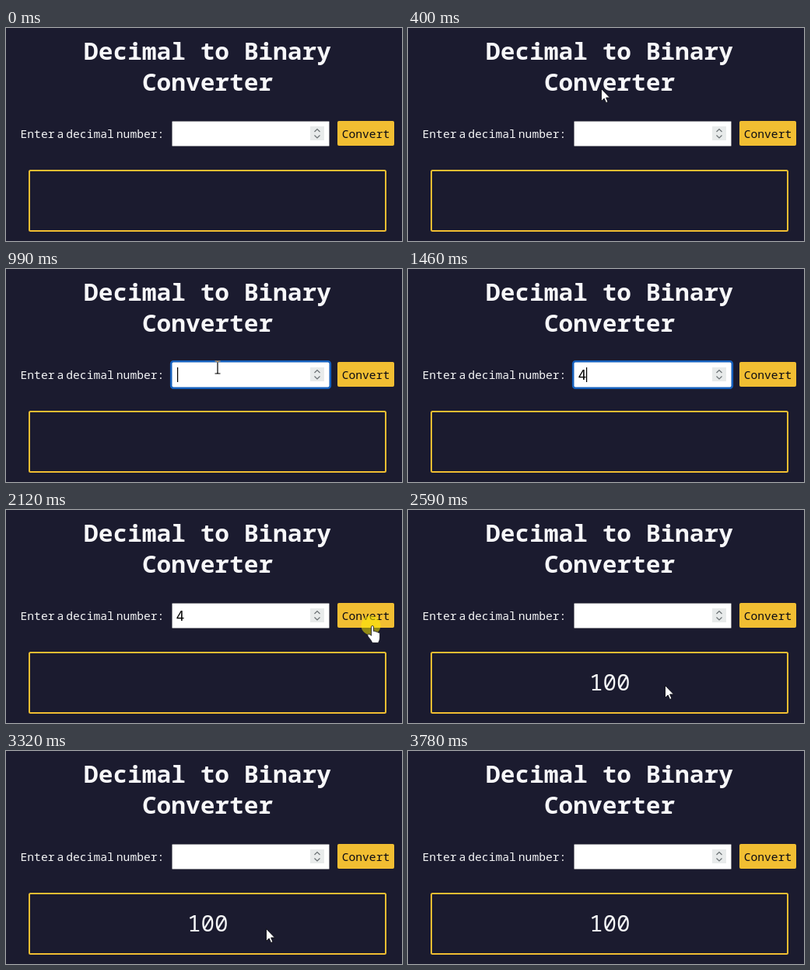
These frames come from a looping animation (509x275 px, 4640 ms). An HTML page:

```html
<!DOCTYPE html>
<html lang="en">
<head>
<meta charset="utf-8">
<title>Decimal to Binary Converter</title>
<style>
  html, body { margin: 0; width: 100%; height: 100%; overflow: hidden; background: #1b1b2f; }
  svg { display: block; width: 509px; height: 275px; }
  text { font-family: "Noto Sans Mono", "DejaVu Sans Mono", monospace; white-space: pre; }
  .title { font-size: 31.17px; font-weight: 700; fill: #f7f7f9; text-anchor: middle; }
  .small { font-size: 14.67px; fill: #f5f6f7; }
  .label { word-spacing: -5.8px; }
  .result { font-size: 29.33px; fill: #f5f6f7; text-anchor: middle; }
  .value { font-size: 18.33px; fill: #000; }
  .beam { mix-blend-mode: difference; }
</style>
</head>
<body>
<svg viewBox="0 0 509 275">
  <rect width="509" height="275" fill="#1b1b2f"/>
  <text class="title" x="259" y="41">Decimal to Binary</text>
  <text class="title" x="259" y="81">Converter</text>
  <text class="small label" x="18.5" y="142">Enter a decimal number:</text>

  <rect x="213.5" y="120.5" width="202" height="32" rx="1" fill="#fff" stroke="#85858c"/>
  <rect id="ring" x="212.2" y="119.2" width="204.6" height="34.6" rx="3" fill="#fff" stroke="#1560bd" stroke-width="2.6"/>
  <rect x="391" y="127" width="18" height="18" fill="#e8ebeb"/>
  <path d="M396.5 134l3.5-3.5 3.5 3.5M396.5 138.500l3.500 3.500 3.500-3.500" fill="none" stroke="#6c7275" stroke-width="1.2"/>
  <text id="value" class="value" x="218.500" y="143">4</text>
  <rect id="caret" y="127" width="1.2" height="19" fill="#000"/>

  <rect x="426" y="120" width="73" height="32" rx="2" fill="#f1be32"/>
  <text class="small" x="431.700" y="142" style="fill:#0a0a14">Convert</text>

  <rect x="30" y="184" width="458" height="78" rx="1.500" fill="none" stroke="#f1be32" stroke-width="2"/>
  <text id="result" class="result" x="259.300" y="233">100</text>

  <circle id="halo" r="12.500" fill="#fff000" fill-opacity=".52"/>
  <path id="arrow" d="M.5.5V16.500L4.200 13 6.600 18.500 9 17.500 6.600 12H11.500Z" fill="#fff" stroke="#0c0c14" stroke-width=".9"/>
  <path id="beam" class="beam" d="M-3.500-8H-1Q0-8 0-7Q0-8 1-8H3.500M0-7V7M-3.500 8H-1Q0 8 0 7Q0 8 1 8H3.500" fill="none" stroke="#fff" stroke-width="1.200"/>
  <path id="hand" d="M5.500 2Q5.500.5 7 .5T8.500 2V7.500Q10.300 6.500 11.300 8.200 13 7.500 13.800 9.200 16.500 8.500 16.500 11V16Q16.500 19 14.500 22.500H7Q5 18.500 1.500 14.500 0 12 2 11.200 4 11 5.500 13.200Z" fill="#fff" stroke="#15151f" stroke-width=".8"/>
</svg>
<script>
const LOOP = 4640;
const $ = id => document.getElementById(id);
const pointers = ["arrow", "beam", "hand"];

// [time, pointer, x, y]; each pose holds until the next
const poses = [
  [0, ""],
  [70, "arrow", 384, 208], [140, "arrow", 340, 150], [200, "arrow", 290, 92],
  [270, "arrow", 255, 66], [330, "arrow", 245, 63], [400, "arrow", 248, 78],
  [530, "arrow", 260, 106],
  [600, "beam", 270, 124], [660, "beam", 272, 127],
  [1130, "beam", 292, 139], [1190, "arrow", 345, 157], [1260, "arrow", 412, 168],
  [1320, "arrow", 475, 172], [1390, ""],
  [1590, "arrow", 496, 153],
  [1790, "hand", 478, 149], [1850, "hand", 469, 149], [1920, "hand", 464, 149],
  [2320, "hand", 462, 151], [2390, "arrow", 440, 168], [2460, "arrow", 398, 194],
  [2520, "arrow", 358, 214], [2590, "arrow", 330, 226], [2650, "arrow", 306, 232],
  [2720, "arrow", 286, 232],
  [2790, "beam", 274, 239], [2850, "beam", 263, 237], [2920, "beam", 255, 236],
  [2980, "beam", 252, 236],
  [3120, "beam", 261, 236], [3190, "beam", 282, 236], [3250, "arrow", 316, 229],
  [3320, "arrow", 334, 229],
  [3650, "arrow", 388, 246], [3715, "arrow", 449, 263], [3780, ""]
];

const show = (id, on) => $(id).setAttribute("visibility", on ? "visible" : "hidden");
const move = (id, x, y) => $(id).setAttribute("transform", `translate(${x} ${y})`);

function render(t) {
  const within = (a, b) => t >= a && t < b;
  const [, kind, x, y] = poses.findLast(p => p[0] <= t);
  pointers.forEach(id => show(id, id === kind));
  if (kind) move(kind, x, y);

  const firstClick = within(660, 860);
  show("halo", firstClick || within(2120, 2260));
  if (firstClick) move("halo", 269.5, 126);
  else move("halo", 469, 149);

  const focused = within(790, 2120);
  const typed = within(1460, 2260);
  show("ring", focused);
  show("caret", focused);
  $("caret").setAttribute("x", typed ? 229 : 220);
  show("value", typed);
  show("result", t >= 2260);
}

const start = performance.now();
function tick() {
  render((performance.now() - start) % LOOP);
  requestAnimationFrame(tick);
}
tick();
</script>
</body>
</html>
```
